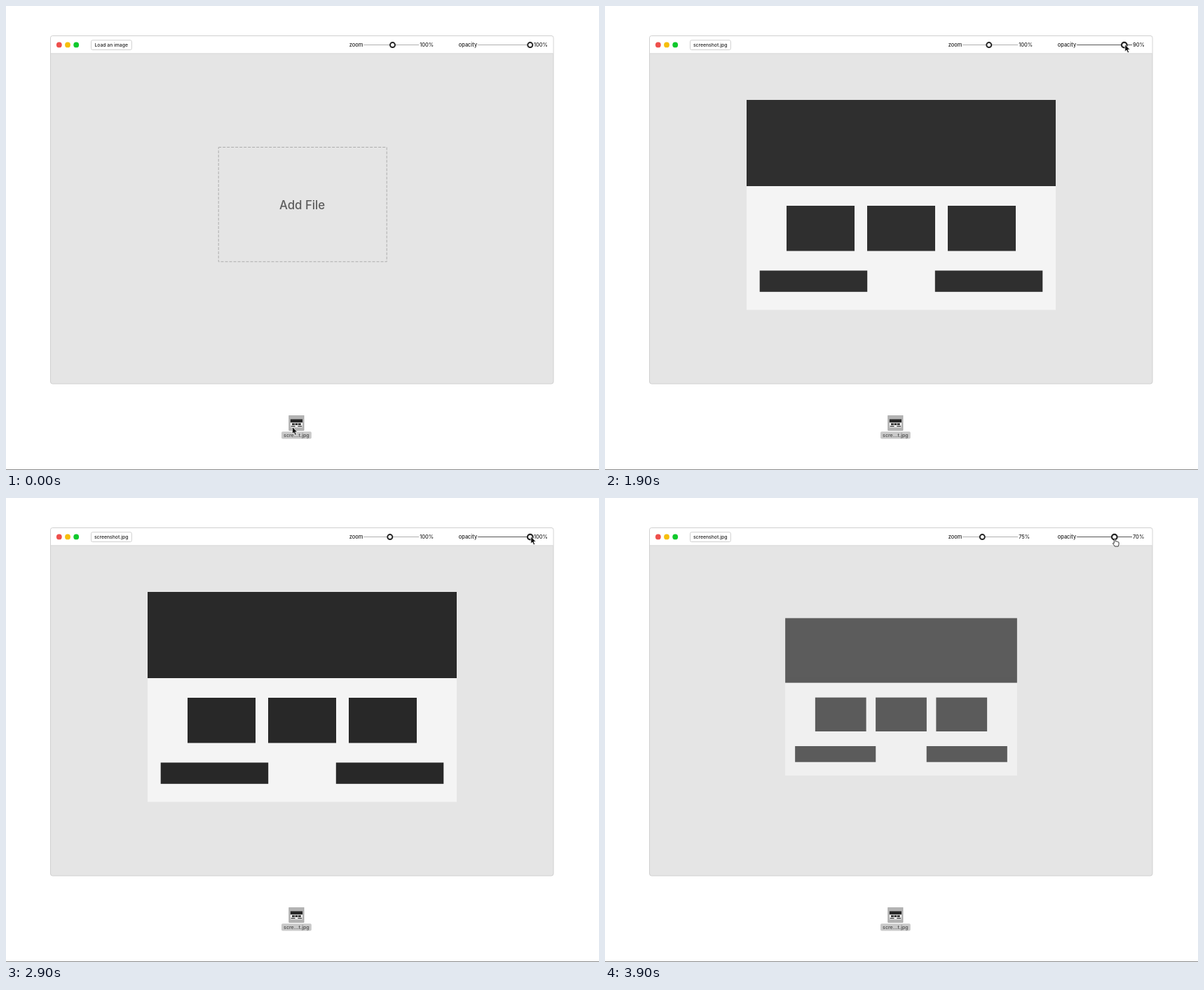
Recreate the animation shown at these times as an HTML page. Size 846 by 662 pixels, loop 4 s.

```html
<!DOCTYPE html>
<html lang="en">
<head>
<meta charset="utf-8">
<title>Image overlay window</title>
<style>
  html, body { margin: 0; width: 100%; height: 100%; overflow: hidden; background: #fff; }
  svg { display: block; }
  text { font: 500 7.4px Inter, sans-serif; fill: #222; }
  .mid { text-anchor: middle; }
  .button { font-size: 6.8px; }
  .prompt { font-size: 16.8px; fill: #5c5c5c; }
  .file { font-size: 7px; font-weight: 600; }
  .track { stroke: #a8a8a8; stroke-width: .9; }
  .knob { r: 3.5px; fill: #fff; stroke: #242424; stroke-width: 2; }
  .active .track { stroke: #444; }
  .active .knob { r: 3.8px; stroke-width: 2.2; }
</style>
</head>
<body>
<svg width="846" height="662" viewBox="0 0 846 662">
  <defs>
    <clipPath id="body"><path d="M64 68H780V538.5H64Z"/></clipPath>
    <rect id="card" x="-48.5" y="1.5" width="97" height="64.5"/>
    <rect id="strip" x="48.3" y="94" width="153.5" height="30.3"/>
    <g id="mock" fill="#252525">
      <rect x="-220.5" y="-149.5" width="441" height="299.5" fill="#f5f5f5"/>
      <rect x="-220.5" y="-149.5" width="441" height="123"/>
      <use href="#card" x="-115"/><use href="#card"/><use href="#card" x="115"/>
      <use href="#strip"/><use href="#strip" transform="scale(-1 1)"/>
    </g>
    <g id="thumb">
      <rect x="403.8" y="584.6" width="21.2" height="21" fill="#b4b4b4" stroke="#9c9c9c" stroke-width=".7"/>
      <use href="#mock" transform="translate(414.4 595.3) scale(.039)"/>
    </g>
  </defs>

  <rect x="63.5" y="42.5" width="717.5" height="496.5" rx="3" fill="#e5e5e5" stroke="#d0d0d0"/>
  <path fill="#fff" d="M64 67.5V46q0-3 3-3H777.5q3 0 3 3V67.5Z"/>
  <path stroke="#d6d6d6" d="M64 67.8H780.5" stroke-width=".8"/>
  <circle cx="75.8" cy="55.4" r="3.9" fill="#ee4f4c"/>
  <circle cx="88" cy="55.4" r="3.9" fill="#f6be0b"/>
  <circle cx="100.2" cy="55.4" r="3.9" fill="#0fc92c"/>
  <rect x="121.5" y="48.8" width="57.8" height="13.7" rx="2" fill="#fff" stroke="#d0d0d0"/>
  <text id="button" class="mid button" x="150.2" y="58.2"></text>
  <g id="zoom"></g>
  <g id="opacity"></g>

  <g id="dropzone">
    <rect x="303.2" y="201.5" width="240" height="163.3" fill="none" stroke="#adadad" stroke-dasharray="4 2"/>
    <text class="mid prompt" x="422.6" y="290">Add File</text>
  </g>
  <g clip-path="url(#body)"><use id="picture" href="#mock"/></g>

  <use href="#thumb"/>
  <rect id="tag" x="393" y="607.3" width="42.8" height="10.2" rx="1.8"/>
  <text id="name" class="mid file" x="414.4" y="614.9">scre...t.jpg</text>
  <use id="ghost" href="#thumb" opacity=".55"/>
  <path stroke="#8c8c8c" d="M0 661.5H846"/>

  <path id="arrow" fill="#111" stroke="#fff" stroke-width=".7" d="M0 0V10L2.3 8L4 11.8L5.8 11L4.2 7.3H7.2Z"/>
  <path id="hand" fill="#fff" stroke="#222" stroke-width=".9" stroke-linejoin="round"
    d="M-1.5 9.5V4Q-1.5 3-.6 3T.4 4V7Q1.4 6.2 2.2 7.2Q3.3 6.6 4 7.7Q5.3 7.4 5.3 9V11Q5 12 4.4 14H-.6Q-1.2 12.4-3.3 10Q-3 8.4-1.5 9.5Z"/>
</svg>
<script>
const $ = id => document.getElementById(id);
const LOOP = 4000, STEP = 100;
const FILE = { x: 408.5, y: 600.5 }, DROP = { x: 424, y: 288 };

const show = (id, on) => $(id).setAttribute('visibility', on ? 'visible' : 'hidden');
const place = (id, x, y, scale = 1) => $(id).setAttribute('transform', `translate(${x} ${y}) scale(${scale})`);
const snap = (v, unit) => Math.round(v / unit) * unit;
const mix = (a, b, k) => ({ x: a.x + (b.x - a.x) * k, y: a.y + (b.y - a.y) * k });

// Smooth 0 to 1 between two times
function ease(t, from, to) {
  const k = Math.min(1, Math.max(0, (t - from) / (to - from)));
  return k * k * (3 - 2 * k);
}

const zoomAt = t => 100 + 30 * (ease(t, 1000, 1500) - ease(t, 1500, 1700))
  + 55 * ease(t, 3000, 3200) - 80 * ease(t, 3300, 3600);
const opacityAt = t => 100 - 90 * (ease(t, 1800, 2300) - ease(t, 2600, 2900)) - 30 * ease(t, 3700, 3900);

function makeSlider(id, left, track) {
  $(id).innerHTML = `<text x="${left}" y="58.2">${id}</text>
    <path class="track" d="M${track} 55.5h78.8"/>
    <circle class="knob" cy="55.6"/>
    <text class="value" x="${track + 79.8}" y="58.2"></text>`;
}

function setSlider(id, value, x, active) {
  const slider = $(id);
  slider.querySelector('.knob').setAttribute('cx', x);
  slider.querySelector('.value').textContent = value + '%';
  slider.classList.toggle('active', active);
}

// The pointer drags the file, then visits the two sliders in turn
function pointerAt(t, zoomX, opacityX) {
  const onZoom = { x: zoomX + 1, y: 54.5 }, onOpacity = { x: opacityX + 1, y: 55 };
  let p = mix(FILE, DROP, ease(t, 0, 450));
  p = mix(p, onZoom, ease(t, 500, 900));
  p = mix(p, onOpacity, ease(t, 1700, 1850));
  p = mix(p, onZoom, ease(t, 2900, 3050));
  p = mix(p, onOpacity, ease(t, 3600, 3700));
  p.y += 20.5 * (ease(t, 2300, 2500) - ease(t, 2500, 2600));
  return p;
}

function draw(t) {
  const zoom = snap(zoomAt(t), 5), opacity = snap(opacityAt(t), 10);
  const zoomX = t < 1000 ? 551.5 : 547.8 + (zoom - 100) * .38;
  const opacityX = 677.8 + opacity * .7;
  const { x, y } = pointerAt(t, zoomX, opacityX);
  const dropped = t >= 500, selected = t >= 100 && t < 1000, pointing = t >= 3800;
  const onZoom = t >= 1000 && t <= 1700 || t > 3000 && t <= 3600;
  const onOpacity = t > 1800 && t <= 2900 && y < 60 || t >= 3700;

  setSlider('zoom', zoom, zoomX, onZoom);
  setSlider('opacity', opacity, opacityX, onOpacity);

  $('button').textContent = dropped ? 'screenshot.jpg' : 'Load an image';
  show('dropzone', !dropped);
  show('picture', dropped);
  place('picture', 422.5, 283.5, zoom / 100);
  $('picture').setAttribute('opacity', opacityAt(t - 25) / 100); // the fade trails the slider

  $('tag').style.fill = selected ? '#0d5bd3' : '#c9c9c9';
  $('name').style.fill = selected ? '#fff' : '#5a5a5a';
  show('ghost', selected && !dropped);
  place('ghost', x - FILE.x, y - FILE.y);

  show('arrow', !pointing);
  show('hand', pointing);
  place('arrow', x, y);
  place('hand', x, y);
}

function tick() {
  draw(Math.floor(performance.now() % LOOP / STEP) * STEP);
  requestAnimationFrame(tick);
}

makeSlider('zoom', 489.8, 510.4);
makeSlider('opacity', 645.8, 673.2);
tick();
</script>
</body>
</html>
```
